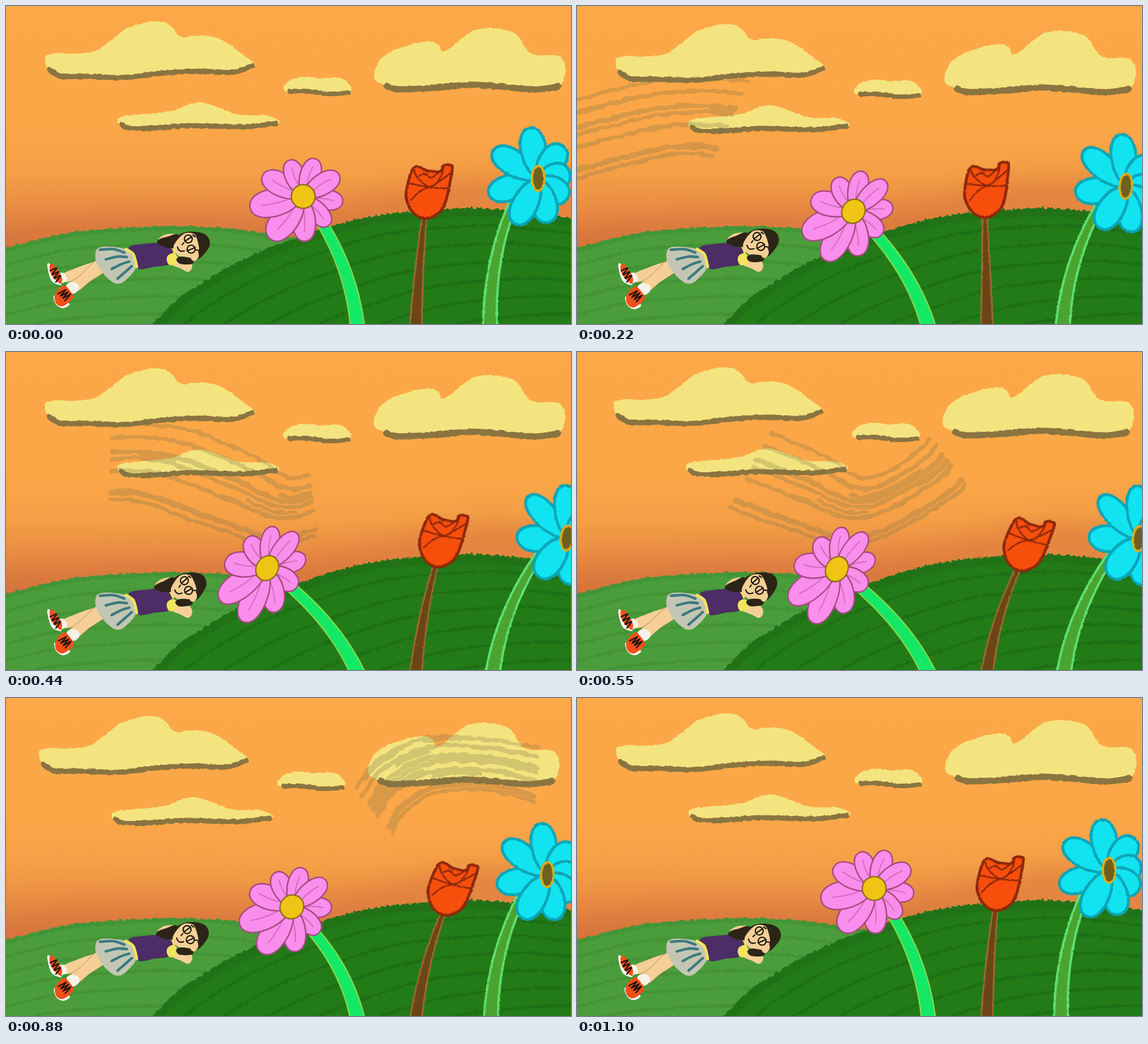
These frames come from a looping animation (998 px wide and 561 px high, 1.21 s). An HTML page:

```html
<!DOCTYPE html>
<html lang="en">
<head>
<meta charset="utf-8">
<title>Breezy hillside</title>
<style>
html, body { margin: 0; width: 100%; height: 100%; overflow: hidden; background: #fda848; }
svg { display: block; width: 100%; height: 100%; }
path, g { stroke-linecap: round; stroke-linejoin: round; }
</style>
</head>
<body>
<svg id="stage" viewBox="0 0 998 561" preserveAspectRatio="none"></svg>
<script>
const STEP = 110, STEPS = 11, TURN = 5, LAST = 10;
const rad = deg => deg * Math.PI / 180;
const cosd = deg => Math.cos(rad(deg));
const mix = (a, b, t) => a + (b - a) * t;
const range = n => [...Array(n).keys()];

let seed = 7;
const random = () => (seed = seed * 16807 % 2147483647) / 2147483647;

// Drawing helpers
function curve(xy, closed = false) {
  const n = xy.length / 2;
  const at = i => {
    const j = closed ? (i + n) % n : Math.max(0, Math.min(n - 1, i));
    return [xy[2 * j], xy[2 * j + 1]];
  };
  let d = `M${at(0)}`;
  for (let i = 0; i < (closed ? n : n - 1); i++) {
    const [a, b, c, e] = [at(i - 1), at(i), at(i + 1), at(i + 2)];
    d += `C${b[0] + (c[0] - a[0]) / 6} ${b[1] + (c[1] - a[1]) / 6} ${c[0] - (e[0] - b[0]) / 6} ${c[1] - (e[1] - b[1]) / 6} ${c}`;
  }
  return d + (closed ? 'Z' : '');
}
const blob = (fill, xy, extra = '') => `<path d="${curve(xy, true)}" fill="${fill}" ${extra}/>`;
const brush = (color, width, xy) => `<path d="${curve(xy)}" fill="none" stroke="${color}" stroke-width="${width}"/>`;
const rough = (id, freq, scale) => `<filter id="${id}" x="-10%" y="-15%" width="120%" height="130%" color-interpolation-filters="sRGB">
  <feTurbulence type="fractalNoise" baseFrequency="${freq}" numOctaves="2" seed="4"/>
  <feDisplacementMap in="SourceGraphic" scale="${scale}" xChannelSelector="R" yChannelSelector="G"/></filter>`;

// Scenery
function hill(id, ridge, fill, band, bandWidth, stripe, dx) {
  const top = curve(ridge), area = `${top}L1015 580L-10 580Z`;
  const stripes = range(6).map(i => `<path d="${top}" transform="translate(${dx * (i + 1)} ${31 * (i + 1)})"/>`).join('');
  return `<clipPath id="${id}"><path d="${area}"/></clipPath>
    <g filter="url(#grass)"><path d="${area}" fill="${fill}"/>
    <g clip-path="url(#${id})" fill="none">
      <path d="${top}" stroke="${band}" stroke-width="${bandWidth}"/>
      <g stroke="${stripe}" stroke-width="5" opacity=".75">${stripes}</g>
    </g></g>`;
}

// The top runs left to right, the shaded underside right to left.
const cloud = (top, under, width) => blob('#f4e47f', [...top, ...under]) + brush('#8a7440', width, under);
const clouds =
  cloud([69, 96, 80, 84, 155, 80, 215, 39, 265, 27, 293, 37, 308, 54, 350, 52, 385, 62, 438, 101],
    [435, 105, 400, 117, 340, 115, 270, 119, 210, 126, 140, 124, 98, 124, 76, 112], 9) +
  cloud([650, 126, 668, 88, 730, 64, 762, 66, 776, 80, 830, 42, 895, 46, 928, 84, 975, 88, 988, 112],
    [976, 142, 930, 147, 830, 139, 760, 144, 695, 147, 672, 141], 11) +
  cloud([490, 147, 497, 134, 525, 125, 555, 128, 590, 127, 608, 140], [605, 153, 570, 155, 530, 150, 501, 151], 8) +
  cloud([196, 204, 210, 194, 290, 186, 342, 170, 410, 191, 460, 193, 481, 202], [477, 207, 420, 213, 320, 211, 270, 215, 217, 215, 205, 209], 9);

// Flowers
function petals(angles, length, width, style, vein) {
  return angles.map(a => {
    const l = length(a), h = width(l) * .66;
    const line = vein ? `<path d="M${l * .3} 0Q${l * .55} -3 ${l * .78} 0" fill="none" stroke="${vein}" stroke-width="2"/>` : '';
    return `<g transform="rotate(${a})"><path d="M0 0C${l * .2} ${-h} ${l} ${-h * 1.1} ${l} 0C${l} ${h * 1.1} ${l * .2} ${h} 0 0Z" ${style}/>${line}</g>`;
  }).join('');
}
const pinkHead = petals(range(9).map(i => 8 + 40 * i), a => 78 + 12 * cosd(a - 150) + 8 * cosd(2 * a - 300), l => l * .49,
  'fill="#fa8eec" stroke="#a84a80" stroke-width="2.6"', '#cf6cbb') +
  '<circle r="21" fill="#efc414" stroke="#8d6a20" stroke-width="2.4"/>';
const blueHead = petals(range(8).map(i => 162 + 45 * i + 11 * Math.sin(i * Math.PI / 7)), a => 80 + 18 * cosd(a - 185) - 6 * cosd(2 * a), () => 43,
  'fill="#12e3f1" stroke="#0ba5b6" stroke-width="5"') +
  '<ellipse rx="11" ry="22" fill="#6f6020" stroke="#d9af1d" stroke-width="4"/>';
const tulipHead = blob('#f74f0b', [-18, -91, -32, -49, -28, -24, -15, -7, 3, -1, 22, -8, 37, -29, 49, -86, 46, -95, 34, -94, 28, -84, 6, -85],
  'stroke="#8f280c" stroke-width="5"') +
  [[-28, -63, 8, -57, 24, -65, 46, -81], [8, -57, -10, -47, -24, -33], [-18, -87, -13, -74, 8, -57, 42, -54],
    [-13, -74, 0, -80, 12, -73, 28, -84], [34, -91, 30, -77, 22, -65]].map(l => brush('#8f280c', 2.8, l)).join('');

// Tapered stem along a quadratic curve.
function stem(top, bend, base, topWidth, baseWidth) {
  const side = (a, b, w) => {
    const l = Math.hypot(b[0] - a[0], b[1] - a[1]);
    return [-(b[1] - a[1]) / l * w / 2, (b[0] - a[0]) / l * w / 2];
  };
  const add = (p, n, s) => `${p[0] + n[0] * s} ${p[1] + n[1] * s}`;
  const n0 = side(top, bend, topWidth), n1 = side(top, base, (topWidth + baseWidth) / 2), n2 = side(bend, base, baseWidth);
  return `M${add(top, n0, 1)}Q${add(bend, n1, 1)} ${add(base, n2, 1)}L${add(base, n2, -1)}Q${add(bend, n1, -1)} ${add(top, n0, -1)}`;
}
const stemPath = (id, fill, edge, width) => `<path id="${id}" fill="${fill}" stroke="${edge}" stroke-width="${width}"/>`;

// Resting girl
const ink = '#17120d', skin = '#f5cf96', hair = '#2d2418';
const laces = (x0, y0, x1, y1, w) => brush(ink, 2.3, range(7).flatMap(i => {
  const t = i / 6, s = i % 2 ? w : -w;
  return [mix(x0, x1, t) + s, mix(y0, y1, t) - s * .8];
}));
const pleat = t => brush('#3b7a80', 4.6, [mix(166, 197, t), mix(430, 481, t), mix(190, 212, t), mix(429, 468, t), mix(209, 222, t), mix(435, 459, t)]);
const legs =
  blob(skin, [172, 450, 150, 453, 122, 463, 101, 473, 105, 487, 130, 480, 166, 468]) +
  blob('#f6f2e8', [92, 473, 102, 471, 108, 483, 98, 489, 92, 484]) +
  blob('#fff', [73, 459, 78, 456, 97, 488, 94, 492, 80, 484]) +
  blob('#f4501a', [77, 458, 84, 456, 98, 477, 97, 490, 88, 484, 79, 472]) +
  laces(83, 463, 93, 483, 5) +
  blob(skin, [164, 446, 132, 474, 113, 490, 126, 503, 146, 488, 184, 460], 'stroke="#8c6a42" stroke-width=".7"');
const frontFoot =
  blob('#f6f2e8', [106, 494, 114, 487, 126, 490, 129, 499, 121, 507, 112, 506]) +
  blob('#fff', [84, 512, 88, 526, 100, 533, 112, 527, 106, 520, 92, 512]) +
  blob('#f4501a', [104, 493, 94, 498, 86, 511, 88, 524, 98, 530, 110, 524, 119, 514, 115, 505]) +
  laces(98, 503, 110, 515, 6);
const torso =
  blob('#c3c6b2', [163, 427, 190, 425, 223, 434, 230, 460, 211, 484, 197, 490, 184, 484, 168, 467, 158, 445]) +
  range(4).map(i => pleat(i / 3)).join('') +
  blob('#4c2d65', [217, 426, 240, 420, 278, 418, 290, 425, 297, 440, 288, 456, 262, 460, 235, 464, 230, 446]) +
  brush('#f2e45c', 5, [212, 429, 225, 438, 231, 460]) +
  blob(skin, [292, 443, 310, 444, 325, 449, 329, 460, 322, 469, 308, 463, 293, 456]) +
  blob('#f2e45c', [286, 440, 296, 436, 303, 444, 299, 455, 289, 457, 284, 449]);
const head =
  blob(skin, [270, 411, 282, 403, 300, 403, 298, 415, 280, 414]) +
  brush('#f2e45c', 4, [291, 422, 296, 430, 298, 438]) +
  blob(hair, [267, 417, 272, 411, 285, 407, 304, 403, 304, 425, 288, 427, 275, 423]) +
  blob(hair, [300, 410, 314, 400, 332, 398, 350, 402, 359, 412, 358, 427, 341, 446, 330, 444, 310, 430]) +
  blob(skin, [296, 424, 304, 411, 316, 401, 329, 401, 336, 407, 341, 428, 336, 438, 325, 445, 309, 443, 299, 435]) +
  blob(hair, [301, 447, 309, 442, 329, 446, 329, 455, 308, 455]) +
  blob(skin, [331, 437, 339, 434, 340, 443, 333, 450, 327, 446]) +
  `<g fill="none" stroke="${ink}" stroke-width="2.2"><circle cx="322" cy="411" r="7"/><circle cx="327" cy="429" r="7"/>
   <path d="M316 415L328 407M320 432L334 426M330 404L334 407M335 430L340 431M311 421L314 418M303 425Q305 435 315 432"/></g>`;

// Wind: strands run between two guides, joined by short random streaks.
const upper = [-12, 168, 140, 133, 300, 133, 430, 180, 510, 222, 600, 178, 655, 112, 745, 70, 850, 73, 955, 90];
const lower = [-12, 307, 155, 264, 240, 265, 358, 306, 500, 338, 663, 255, 700, 205, 760, 167, 860, 163, 945, 187];
const strands = [0, .17, .36, .45, .61, .9, 1].map((lane, i) => ({ lane, from: 0, to: 9, width: 7 + i % 3 }));
const streaks = range(22).map(() => {
  const from = mix(1.2, 7.5, random());
  return { lane: random(), from, to: from + mix(.4, 1, random()), width: mix(5, 9, random()) };
});

function along(guide, u) {
  const i = Math.min(8, Math.floor(u)), t = u - i;
  return [0, 1].map(axis => {
    const v = k => guide[2 * Math.max(0, Math.min(9, k)) + axis];
    const [a, b, c, d] = [v(i - 1), v(i), v(i + 1), v(i + 2)];
    return b + t / 2 * (c - a + t * (2 * a - 5 * b + 4 * c - d + t * (3 * (b - c) + d - a)));
  });
}
function wind(tail, front) {
  return [...strands, ...streaks].map(({ lane, from, to, width }) => {
    const a = Math.max(from, tail), b = Math.min(to, front);
    if (b <= a) return '';
    const n = Math.ceil((b - a) * 5);
    return brush('#78734a', width, range(n + 1).flatMap(i => {
      const u = mix(a, b, i / n), p = along(upper, u), q = along(lower, u);
      return [mix(p[0], q[0], lane), mix(p[1], q[1], lane)];
    }));
  }).join('');
}

const stage = document.getElementById('stage');
stage.innerHTML = `<defs>
  <linearGradient id="sky" x2="0" y2="1"><stop stop-color="#fda848"/><stop offset=".36" stop-color="#fca747"/>
    <stop offset=".52" stop-color="#f5a046"/><stop offset=".64" stop-color="#e98d44"/><stop offset=".76" stop-color="#da783f"/></linearGradient>
  <filter id="haze" x="-20%" y="-150%" width="140%" height="400%"><feGaussianBlur stdDeviation="26"/></filter>
  ${rough('chalk', .12, 4)}${rough('grass', .16, 8)}${rough('crayon', .25, 3)}${rough('breeze', .06, 9)}</defs>
  <rect width="998" height="561" fill="url(#sky)"/>
  <g filter="url(#haze)" opacity=".45">${brush('#cb6638', 46, [-60, 425, 100, 405, 300, 392, 480, 400, 640, 370, 820, 330, 1060, 340])}</g>
  <g id="clouds"><g filter="url(#chalk)">${clouds}</g></g>
  <g id="wind" filter="url(#breeze)" opacity=".27"></g>
  ${hill('back', [-10, 430, 100, 402, 200, 392, 300, 388, 400, 393, 520, 411], '#4a9d3a', '#429537', 14, '#429036', -6)}
  ${hill('front', [250, 572, 300, 520, 350, 486, 420, 447, 500, 414, 640, 372, 800, 357, 880, 360, 1015, 376], '#237b18', '#217217', 30, '#1d6b14', 28)}
  ${legs}<g id="foot">${frontFoot}</g>${torso}<g id="head">${head}</g>
  <g filter="url(#crayon)">${stemPath('tulipStem', '#6c4517', '#9a6a2e', 3)}${stemPath('blueStem', '#4aa42f', '#5fe072', 4)}</g>
  ${stemPath('pinkStem', '#14e866', '#83d84e', 2.5)}
  <g id="pink">${pinkHead}</g>
  <g id="tulip"><g filter="url(#crayon)">${tulipHead}</g></g>
  <g id="blue"><g filter="url(#crayon)">${blueHead}</g></g>`;

// Motion
const el = id => document.getElementById(id);
const place = (id, x, y, turn = 0, skew = 0) =>
  el(id).setAttribute('transform', `translate(${x} ${y}) rotate(${turn}) skewY(${skew})`);
const shape = (id, ...parts) => el(id).setAttribute('d', stem(...parts));

// Cosine glide through [step, value] keys.
function glide(keys, k) {
  const i = Math.max(1, keys.findIndex(key => key[0] >= k));
  const [[k0, v0], [k1, v1]] = [keys[i - 1], keys[i]];
  return mix(v0, v1, (1 - Math.cos(Math.PI * (k - k0) / (k1 - k0))) / 2);
}
function fromHead(x, y, turn, dx, dy) {
  const c = cosd(turn), s = Math.sin(rad(turn));
  return [x + dx * c - dy * s, y + dx * s + dy * c];
}

function draw(k) {
  const back = Math.max(0, k / TURN - 1);
  const push = 1 - (1 - Math.min(1, k / TURN) ** 1.4) ** 2.5;
  const sway = back ? (1 - back) ** 1.3 : push;
  const dip = back ? 1 - back ** 2.3 : push;

  place('clouds', glide([[0, 0], [1, -3], [3, 1], [7.5, -12], [LAST, 0]], k), 2.7 * (1 - Math.cos(2 * Math.PI * k / 5)));
  el('wind').innerHTML = k < LAST ? wind(Math.max(0, k - 2.7), Math.min(9, 1.13 * k - .25)) : '';
  el('head').setAttribute('transform', `translate(${-4 * sway} ${-5 * sway}) rotate(${-8 * sway} 300 432)`);
  place('foot', Math.min(1, 2 * sway), Math.min(2, 4 * sway));

  const pinkX = mix(525, 459, sway), pinkY = mix(336, 383, dip);
  place('pink', pinkX, pinkY, -11 * sway, -11 * sway);
  const p = fromHead(pinkX, pinkY, -16 * sway, 29, 40);
  shape('pinkStem', p, [mix(610, 582, sway), mix(464, 484, dip)], [621, 566], 18, 25);

  const blueX = mix(940, 993, sway), blueY = mix(304, 329, sway);
  place('blue', blueX, blueY, 9 * sway, 9 * sway);
  const b = fromHead(blueX, blueY, 12 * sway, -42, 38);
  shape('blueStem', b, [mix(853, 876, sway), mix(446, 458, sway)], [mix(855, 860, sway), 566], 13, 25);

  const tulipX = glide([[0, 739], [1, 714], [6.5, 793], [LAST, 739]], k);
  const tulipY = 374 + 18 * ((tulipX - 714) / 79) ** 2;
  place('tulip', tulipX, tulipY, (tulipX - 739) * .24);
  shape('tulipStem', [tulipX, tulipY - 4], [mix(724, tulipX, .28), 466], [724, 566], 8, 21);
}

let shown = -1;
const start = performance.now();
function tick() {
  const k = Math.floor((performance.now() - start) / STEP) % STEPS;
  if (k !== shown) draw(shown = k);
  requestAnimationFrame(tick);
}
tick();
</script>
</body>
</html>
```
